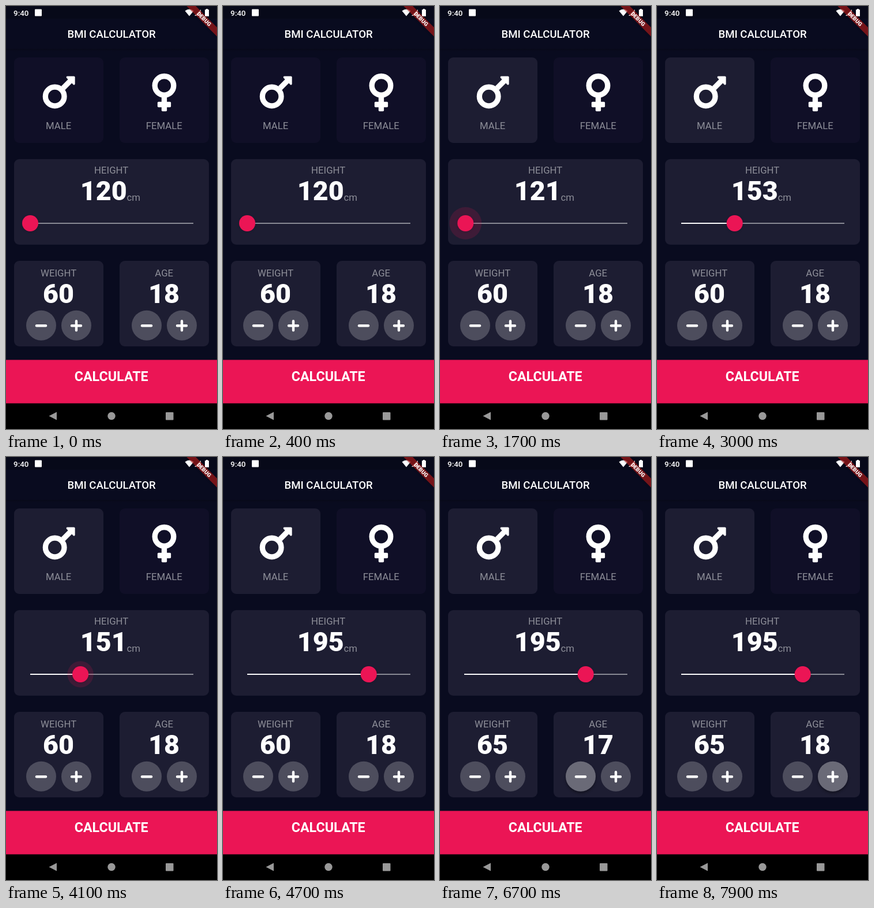
Write an HTML page that moves like this. It is 366 px wide and 732 px high and loops after 8 s.

```html
<!DOCTYPE html>
<html lang="en">
<head>
<meta charset="utf-8">
<title>BMI Calculator</title>
<style>
  html, body { margin: 0; width: 100%; height: 100%; overflow: hidden; background: #090b1f; }
  svg { display: block; width: 366px; height: 732px; font-family: Roboto, sans-serif; }
  text { text-anchor: middle; fill: #fff; }
  .label { font-size: 16.8px; fill: #8d8e98; }
  .num { font-size: 46.6px; font-weight: 900; }
  .card { fill: #1d1d32; }
  .sign { stroke: #fff; stroke-width: 4.4; stroke-linecap: round; }
</style>
</head>
<body>
<svg viewBox="0 0 366 732">
  <defs>
    <linearGradient id="shade" x2="0" y2="1">
      <stop stop-color="#000" stop-opacity=".18"/>
      <stop offset="1" stop-color="#000" stop-opacity="0"/>
    </linearGradient>
    <filter id="soft" x="-50%" y="-50%" width="200%" height="200%">
      <feGaussianBlur stdDeviation="2"/>
    </filter>
  </defs>
  <rect width="366" height="732" fill="#090b1f"/>
  <rect y="74" width="366" height="5" fill="url(#shade)"/>
  <rect width="366" height="22" fill="#070919"/>
  <text x="183" y="55" font-size="18.6" font-weight="500">BMI CALCULATOR</text>

  <g class="card">
    <rect id="male" x="14" y="89" width="155" height="148" rx="9"/>
    <rect x="197" y="89" width="155" height="148" rx="9" fill="#100f27"/>
    <rect x="14" y="265" width="338" height="148" rx="9"/>
    <rect x="14" y="441" width="155" height="148" rx="9"/>
    <rect x="197" y="441" width="155" height="148" rx="9"/>
  </g>

  <g transform="translate(63.7 112.2) scale(.1457)" fill="#fff">
    <circle cx="144" cy="304" r="112" fill="none" stroke="#fff" stroke-width="64"/>
    <path d="M221 182l80.4-80.7-16.9-16.9C277 77 282 64 293 64h79q12 0 12 12v79c0 11-13 16-20.4 8.5l-16.9-16.9-80.7 80.7z"/>
  </g>
  <g transform="translate(253.5 112.2) scale(.1457)" fill="#fff">
    <circle cx="144" cy="176" r="112" fill="none" stroke="#fff" stroke-width="64"/>
    <rect x="112" y="300" width="64" height="180" rx="12"/>
    <rect x="64" y="368" width="160" height="64" rx="12"/>
  </g>

  <g class="label">
    <text class="label" x="91.2" y="213">MALE</text>
    <text class="label" x="274.2" y="213">FEMALE</text>
    <text class="label" x="182.7" y="290">HEIGHT</text>
    <text class="label" x="91.2" y="468">WEIGHT</text>
    <text class="label" x="274.2" y="468">AGE</text>
    <text class="label" x="221.3" y="336.6">cm</text>
  </g>
  <text class="num" id="height" x="169.3" y="336">120</text>
  <text class="num" id="weight" x="91" y="514">60</text>
  <text class="num" id="age" x="274" y="514">18</text>

  <rect x="42" y="375.1" width="283" height="1.9" fill="#8d8e98"/>
  <rect id="track" x="42" y="375.1" height="1.9" fill="#fff"/>
  <g id="thumb">
    <circle id="halo" fill="#eb1555" opacity=".16"/>
    <circle cy="1" r="14" fill="#000" opacity=".12" filter="url(#soft)"/>
    <circle r="14" fill="#eb1555"/>
  </g>

  <g id="buttons"></g>

  <rect y="612.4" width="366" height="75.4" fill="#eb1555"/>
  <text x="182.7" y="649" font-size="23.3" font-weight="700">CALCULATE</text>

  <rect y="687.7" width="366" height="45" fill="#000"/>
  <g fill="#999">
    <path d="M74.500 709.500L88 702.500V716.500Z"/>
    <circle cx="183" cy="709.500" r="6.700"/>
    <rect x="277" y="703" width="13.500" height="13.500" rx="1"/>
  </g>

  <g fill="#fff">
    <text x="26.2" y="16.5" font-size="13.3" font-weight="500">9:40</text>
    <rect x="50" y="5.5" width="12" height="12" rx="1"/>
    <path d="M310.5 8.5Q318 2.5 325.5 8.5L318 17.5Z"/>
    <path d="M338 6V17H327Z"/>
    <path d="M345 6.5H347V5H350V6.5H352V17.5H345Z"/>
  </g>
  <g transform="translate(366 0) rotate(45)">
    <rect x="-38" y="26.1" width="76" height="11.2" fill="#000" opacity=".3" filter="url(#soft)"/>
    <rect x="-38" y="26.1" width="76" height="11.2" fill="#b71c1c" opacity=".63"/>
    <text y="35" font-size="9.5" font-weight="900">DEBUG</text>
  </g>
  <path d="M345 6.5H347V5H350V6.5H352V17.5H345Z" fill="#fff"/>
</svg>
<script>
const LOOP = 8000, STEP = 2.81;
const $ = id => document.getElementById(id);
const clamp = v => Math.max(0, Math.min(1, v));
const ramp = (t, a, b) => clamp((t - a) / (b - a));
const ease = x => x * x * (3 - 2 * x);

// Tap times for each round button
const buttons = [
  { x: 61, taps: [] },
  { x: 122, plus: true, taps: [5190, 5390, 5590, 5790, 5990] },
  { x: 244, taps: [6680, 6890, 7100] },
  { x: 305, plus: true, taps: [7480, 7680, 7880] }
];

$('buttons').innerHTML = buttons.map(b => `<g transform="translate(${b.x} 552.7)">
  <circle class="shadow" cy="3" r="26" filter="url(#soft)" opacity="0"/>
  <circle r="26" fill="#4d4d5d"/>
  <circle class="glow" r="26" fill="#fff" opacity="0"/>
  <path class="sign" d="M-8 .5H8${b.plus ? 'M0-7.5V8.5' : ''}"/></g>`).join('');
const groups = [...$('buttons').children];
groups.forEach((g, i) => {
  buttons[i].glow = g.querySelector('.glow');
  buttons[i].shadow = g.querySelector('.shadow');
});

const count = (b, t) => b.taps.filter(s => s <= t).length;
const press = (b, t) => Math.max(0, ...b.taps.map(s =>
  ramp(t, s - 100, s - 10) * (1 - ramp(t, s + 50, s + 190))));

function heightAt(t) {
  if (t < 4020) return 120 + 33 * ease(ramp(t, 1650, 2200));
  return 151 + 44 * ease(ramp(t, 4100, 4520));
}

function haloAt(t) {
  return ramp(t, 1560, 1660) * (1 - ramp(t, 2220, 2320)) +
         ramp(t, 4020, 4120) * (1 - ramp(t, 4550, 4660));
}

function draw(t) {
  const h = heightAt(t), w = (h - 120) * STEP;
  $('male').setAttribute('fill', t < 1300 ? '#100f27' : '#1d1d32');
  $('height').textContent = Math.round(h);
  $('track').setAttribute('width', w);
  $('thumb').setAttribute('transform', `translate(${42 + w} 376)`);
  $('halo').setAttribute('r', 28 * haloAt(t));
  $('weight').textContent = 60 + count(buttons[1], t);
  $('age').textContent = 18 - count(buttons[2], t) + count(buttons[3], t);
  for (const b of buttons) {
    const p = press(b, t);
    b.glow.setAttribute('opacity', 0.16 * p);
    b.shadow.setAttribute('opacity', 0.35 * p);
  }
}

const start = performance.now();
function tick() {
  draw((performance.now() - start) % LOOP);
  requestAnimationFrame(tick);
}
draw(0);
requestAnimationFrame(tick);
</script>
</body>
</html>
```
